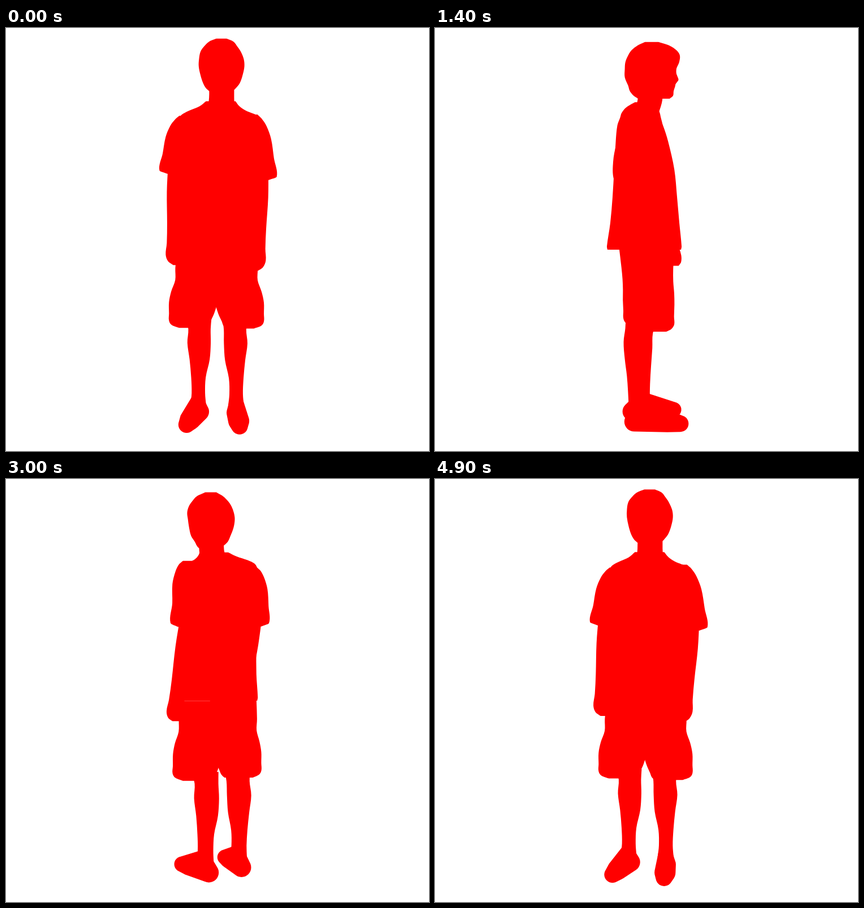
Animation, 748 px wide and 748 px high, one loop 5000 ms. Source, as an HTML page with a canvas:

```html
<!DOCTYPE html>
<html lang="en">
<head>
<meta charset="utf-8">
<title>Turning figure</title>
<style>
  html, body { margin: 0; width: 100%; height: 100%; overflow: hidden; background: #fff; }
  canvas { display: block; width: 100vw; height: 100vh; }
</style>
</head>
<body>
<canvas id="stage" width="748" height="748"></canvas>
<script>
// A solid figure on a turntable, seen as a silhouette.
// Body space: x to the figure's left hand, y down, z out of the chest.
const LOOP = 5000, STEP = 100, START = -6;
const MID = { x: 374, y: 372 }, CAMERA = 1150;
const ctx = document.getElementById('stage').getContext('2d');

// Stacks of elliptical slices: [y, x, z, half width, half depth]
const head = [
  [22, 8, 10, 9, 12], [28, 8, 13, 21, 28], [37, 7, 14, 29, 40], [46, 7, 14, 35, 46],
  [58, 8, 11, 39, 48], [70, 8, 8, 40, 46], [85, 8, 8, 37, 46], [100, 8, 10, 32, 42],
  [110, 7, 10, 25, 39], [118, 8, 13, 16, 35], [123, 8, 14, 10, 28]
];
const neck = [[100, 8, 6, 22, 22], [125, 8, 7, 22, 22], [150, 6, 0, 24, 22]];
const trunk = [
  [130, 6, 2, 26, 22], [138, 3, -4, 36, 29], [145, -1, -9, 52, 31], [151, 1, -11, 66, 33],
  [158, 3, -12, 73, 34], [172, 3, -11, 78, 40], [200, 2, -8, 78, 46], [250, 0, -4, 72, 53],
  [300, 0, -3, 70, 57], [345, 0, -3, 69, 61], [386, 0, -4, 70, 66], [392, 0, -4, 69, 65]
];
const shorts = [
  [392, 30, -1, 40, 46], [425, 32, 0, 41, 43], [446, 33, 1, 40, 42], [466, 38, 2, 42, 42],
  [485, 41, 2, 43, 42], [505, 44, 2, 40, 41], [518, 47, 2, 37, 41], [526, 46, 1, 33, 37],
  [531, 42, 0, 24, 30]
];
const leg = [
  [515, 33, -10, 23, 25], [535, 32, -14, 20, 22], [560, 33, -16, 21, 23], [590, 32, -16, 18, 21],
  [622, 34, -15, 13, 18], [650, 34, -14, 12, 17], [670, 34, -12, 14, 18]
];

// Arm slices leave out z, which follows the bend of the elbow.
const sleeve = [
  [152, 58, 12, 20], [158, 62, 15, 26], [170, 66, 20, 28], [190, 72, 22, 30],
  [220, 76, 23, 28], [251, 80, 24, 25], [257, 74, 16, 17]
];
const forearm = [
  [240, 72, 17, 16], [290, 73, 16, 16], [345, 72, 14, 15], [380, 72, 13, 15],
  [400, 72, 14, 16], [412, 70, 11, 13], [418, 66, 6, 8]
];

// Groups of balls, wrapped tightly: [y, x, z, radius]
const nose = [[78, 8, 50, 4], [88, 8, 54, 4], [96, 8, 48, 4]];
const foot = [[686, 33, -24, 17], [664, 35, -6, 13], [685, 42, 32, 18], [688, 45, 54, 14]];

const place = (part, side, shift = 0) =>
  part.map(([y, x, ...rest]) => [y, side * x + shift, ...rest]);

function arm(part, side, drop, elbow, hand) {
  return part.map(([y, x, a, b]) => {
    const z = y < 240 ? -11 + (elbow + 11) * (y - 152) / 88
                      : elbow + (hand - elbow) * (y - 240) / 160;
    return [y + drop * Math.min(1, (y - 152) / 90), side * x, z, a, b];
  });
}

const stacks = [head, neck, trunk];
const wraps = [nose];
for (const side of [-1, 1]) {
  const bend = side < 0 ? [0, -4, 36] : [10, -34, 24];
  stacks.push(place(shorts, side, -2), place(leg, side, -2));
  stacks.push(arm(sleeve, side, ...bend), arm(forearm, side, ...bend));
  wraps.push(place(foot, side, -2));
}

function project(x, y, z, cos, sin) {
  const scale = 1 + (z * cos - x * sin) / CAMERA;
  return {
    x: MID.x + (x * cos + z * sin) * scale,
    y: MID.y + (y - MID.y) * scale,
    scale
  };
}

// Smooth curve through points whose y runs steadily one way.
function curve(pts) {
  const last = pts.length - 1;
  const slope = i => {
    const p = pts[Math.max(0, i - 1)], q = pts[Math.min(last, i + 1)];
    return (q.x - p.x) / (q.y - p.y);
  };
  ctx.lineTo(pts[0].x, pts[0].y);
  for (let i = 0; i < last; i++) {
    const p = pts[i], q = pts[i + 1], h = (q.y - p.y) / 3;
    ctx.bezierCurveTo(p.x + slope(i) * h, p.y + h,
                      q.x - slope(i + 1) * h, q.y - h, q.x, q.y);
  }
}

function drawStack(slices, cos, sin) {
  const left = [], right = [];
  for (const [y, x, z, a, b] of slices) {
    const p = project(x, y, z, cos, sin);
    const w = Math.hypot(a * cos, b * sin) * p.scale;
    left.push({ x: p.x - w, y: p.y });
    right.unshift({ x: p.x + w, y: p.y });
  }
  ctx.beginPath();
  curve(left);
  curve(right);
  ctx.fill();
}

function hull(pts) {
  const chain = list => {
    const out = [];
    for (const p of list) {
      while (out.length > 1) {
        const [a, b] = out.slice(-2);
        if ((b.x - a.x) * (p.y - a.y) > (b.y - a.y) * (p.x - a.x)) break;
        out.pop();
      }
      out.push(p);
    }
    return out;
  };
  pts.sort((p, q) => p.x - q.x || p.y - q.y);
  return [...chain(pts), ...chain(pts.slice().reverse())];
}

function drawWrap(balls, cos, sin) {
  const pts = [];
  for (const [y, x, z, r] of balls) {
    const p = project(x, y, z, cos, sin);
    for (let a = 0; a < 2 * Math.PI; a += Math.PI / 16) {
      pts.push({ x: p.x + r * p.scale * Math.cos(a), y: p.y + r * p.scale * Math.sin(a) });
    }
  }
  ctx.beginPath();
  hull(pts).forEach(p => ctx.lineTo(p.x, p.y));
  ctx.fill();
}

function draw(time) {
  const t = Math.floor((time % LOOP) / STEP) * STEP;
  const turn = (START + 360 * t / LOOP) * Math.PI / 180;
  const cos = Math.cos(turn), sin = Math.sin(turn);
  ctx.fillStyle = '#fff';
  ctx.fillRect(0, 0, 748, 748);
  ctx.fillStyle = '#f00';
  stacks.forEach(s => drawStack(s, cos, sin));
  wraps.forEach(w => drawWrap(w, cos, sin));
}

let begin;
function tick(now) {
  begin ??= now;
  draw(Math.max(0, now - begin));
  requestAnimationFrame(tick);
}
requestAnimationFrame(tick);
</script>
</body>
</html>
```
